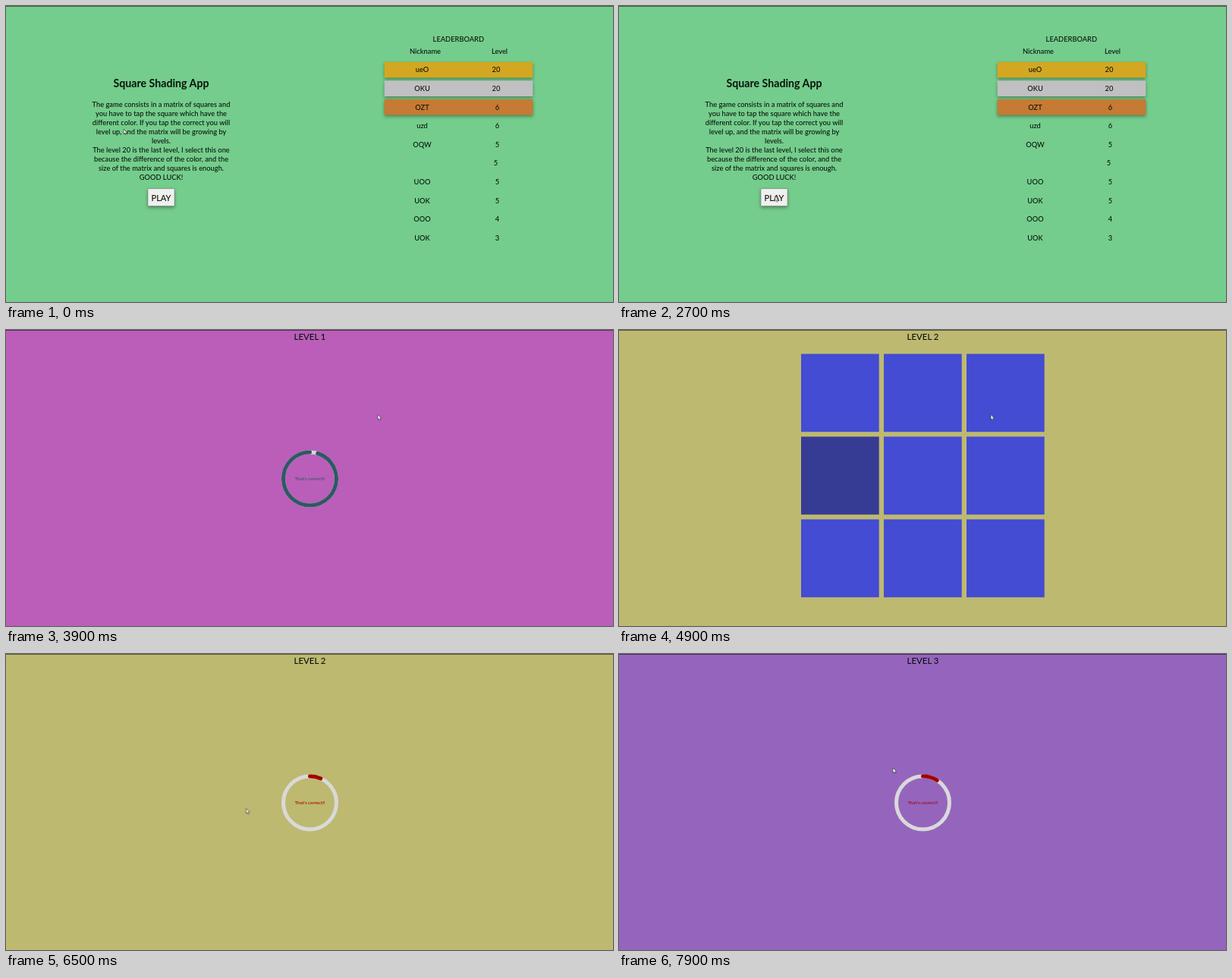
Animation, 800 px wide and 390 px high, one loop 8 s. Source, as an HTML page:

```html
<!DOCTYPE html>
<html lang="en">
<head>
<meta charset="utf-8">
<title>Colour squares game</title>
<style>
html, body { margin: 0; width: 100%; height: 100%; overflow: hidden; background: #74cd8c; }
svg { display: block; width: 100vw; height: 100vh; }
text { font: 500 9.3px Lato, "Open Sans", sans-serif; text-anchor: middle; fill: #0a120c; }
.title { font-size: 14.2px; font-weight: 700; }
.level { font-size: 11.4px; }
.play { font-size: 11px; }
.raised { filter: drop-shadow(0 2.5px 2px rgba(0, 0, 0, .36)); }

/* One loop is 8 s, so 100 ms is 1.25%. */
.scene { animation: 8s step-end infinite; }
.l1 { animation-name: l1; }
.r1 { animation-name: r1; }
.l2 { animation-name: l2; }
.r2 { animation-name: r2; }
.l3 { animation-name: l3; }
.r3 { animation-name: r3; }
@keyframes l1 { 0% { opacity: 0 } 36.25%, 100% { opacity: 1 } }
@keyframes r1 { 0% { opacity: 0 } 48.75%, 100% { opacity: 1 } }
@keyframes l2 { 0% { opacity: 0 } 61.25%, 100% { opacity: 1 } }
@keyframes r2 { 0% { opacity: 0 } 71.25%, 100% { opacity: 1 } }
@keyframes l3 { 0% { opacity: 0 } 83.75%, 100% { opacity: 1 } }
@keyframes r3 { 0% { opacity: 0 } 91.25%, 100% { opacity: 1 } }

/* The one-second countdown ticks ten times. */
.arc {
  fill: none; stroke-width: 5; stroke-linecap: round; stroke-dasharray: 100 100;
  animation: drain 1s steps(10) infinite, tint 1s infinite;
  animation-delay: var(--wait);
}
.note { font-size: 6.1px; animation: tint 1s infinite; animation-delay: var(--wait); }
@keyframes drain {
  from { stroke-dashoffset: var(--gone); }
  to { stroke-dashoffset: calc(var(--gone) + 100); }
}
@keyframes tint {
  0% { color: rgb(43, 91, 98); animation-timing-function: steps(3); }
  30% { color: rgb(239, 167, 1); animation-timing-function: steps(3); }
  60%, 100% { color: #a30000; }
}

.cursor { animation: move 8s step-end infinite; }
@keyframes move {
  0% { transform: translate(155px, 162px); animation-timing-function: steps(10); }
  12.5% { transform: translate(110px, 226px); animation-timing-function: steps(2); }
  15% { transform: translate(80px, 262px); animation-timing-function: steps(4); }
  20% { transform: translate(180.5px, 245px); animation-timing-function: steps(4); }
  25% { transform: translate(205.5px, 250.5px); }
  38.75% { transform: translate(205.5px, 250.5px); animation-timing-function: steps(5); }
  45% { transform: translate(396px, 134px); }
  46.25% { transform: translate(490px, 111.5px); }
  61.25% { transform: translate(490px, 111.5px); animation-timing-function: steps(5); }
  67.5% { transform: translate(316.5px, 203.5px); }
  85% { transform: translate(316.5px, 203.5px); animation-timing-function: steps(3); }
  88.75%, 100% { transform: translate(361px, 150px); }
}
</style>
</head>
<body>
<svg id="stage" viewBox="0 0 800 390" preserveAspectRatio="none"></svg>
<script>
const text = (x, y, s, cls = '') => `<text x="${x}" y="${y}" class="${cls}">${s}</text>`;
const rect = (x, y, w, h, fill, more = '') =>
  `<rect x="${x}" y="${y}" width="${w}" height="${h}" fill="${fill}" ${more}/>`;

const intro = [
  'The game consists in a matrix of squares and',
  'you have to tap the square which have the',
  'different color. If you tap the correct you will',
  'level up, and the matrix will be growing by',
  'levels.',
  'The level 20 is the last level, I select this one',
  'because the difference of the color, and the',
  'size of the matrix and squares is enough.',
  'GOOD LUCK!'
];
const scores = [
  ['ueO', 20], ['OKU', 20], ['OZT', 6], ['uzd', 6], ['OQW', 5],
  ['', 5], ['UOO', 5], ['UOK', 5], ['OOO', 4], ['UOK', 3]
];
const medals = ['#d3a722', '#c0bfc1', '#c67a33'];

function home() {
  const lines = intro.map((s, i) => text(204.5, 133 + i * 12.05, s)).join('');
  const rows = scores.map(([name, level], i) => {
    const y = 84 + i * 24.6;
    const bar = medals[i] ? rect(498.7, y - 10.2, 195.6, 20.6, medals[i], 'class="raised"') : '';
    const x = i < 2 ? 646 : name ? 647.5 : 645.5;
    return bar + text(548.5, y + 3.4, name) + text(x, y + 3.4, level);
  }).join('');
  return rect(0, 0, 800, 390, '#74cd8c')
    + text(204.5, 107, 'Square Shading App', 'title') + lines
    + rect(187, 240.8, 35, 22.7, '#efefef', 'class="raised" stroke="#777" stroke-width=".5"')
    + text(204.5, 256.5, 'PLAY', 'play')
    + text(596.3, 46.8, 'LEADERBOARD') + text(552.5, 63.2, 'Nickname') + text(650.5, 63.2, 'Level')
    + rows;
}

function grid(n, odd, fill, oddFill) {
  const gap = 6.3, size = (320.7 - gap * (n - 1)) / n;
  let out = '';
  for (let i = 0; i < n * n; i++) {
    const x = 240 + (i % n) * (size + gap), y = 31.5 + Math.floor(i / n) * (size + gap);
    out += rect(x, y, size, size, i === odd ? oddFill : fill);
  }
  return out;
}

function ring(gone, wait) {
  return `<g style="--gone:${gone};--wait:${wait}s">
    <circle cx="400.5" cy="196" r="35" fill="none" stroke="#d9d9d9" stroke-width="5"/>
    <path class="arc" stroke="currentColor" pathLength="100" d="M400.5 161a35 35 0 1 0 0 70a35 35 0 1 0 0-70"/>
    <text class="note" x="400.5" y="198" style="fill:currentColor">That's correct!!</text></g>`;
}

function level(k, bg, cells, timer) {
  const back = rect(0, 0, 800, 390, bg), head = text(400.5, 12.6, 'LEVEL ' + k, 'level');
  return `<g class="scene l${k}">${back}${head}${grid(...cells)}
    <g class="scene r${k}">${back}${head}${ring(...timer)}</g></g>`;
}

document.getElementById('stage').innerHTML = home()
  + level(1, '#ba5eba', [2, 1, '#4bd543', '#3b9336'], [4.7, -.1])
  + level(2, '#beb970', [3, 3, '#434cd3', '#363c94'], [6.7, -.3])
  + level(3, '#9565be', [4, 5, '#85cc43', '#67963c'], [9, -.7])
  + rect(0, 0, 800, 1, '#000', 'opacity=".5"')
  + '<path class="cursor" d="M0 0V6.6L1.5 5.3L2.5 7.6L3.6 7.1L2.7 4.9H4.7Z" fill="#fff" stroke="#222" stroke-width=".6"/>';
</script>
</body>
</html>
```
